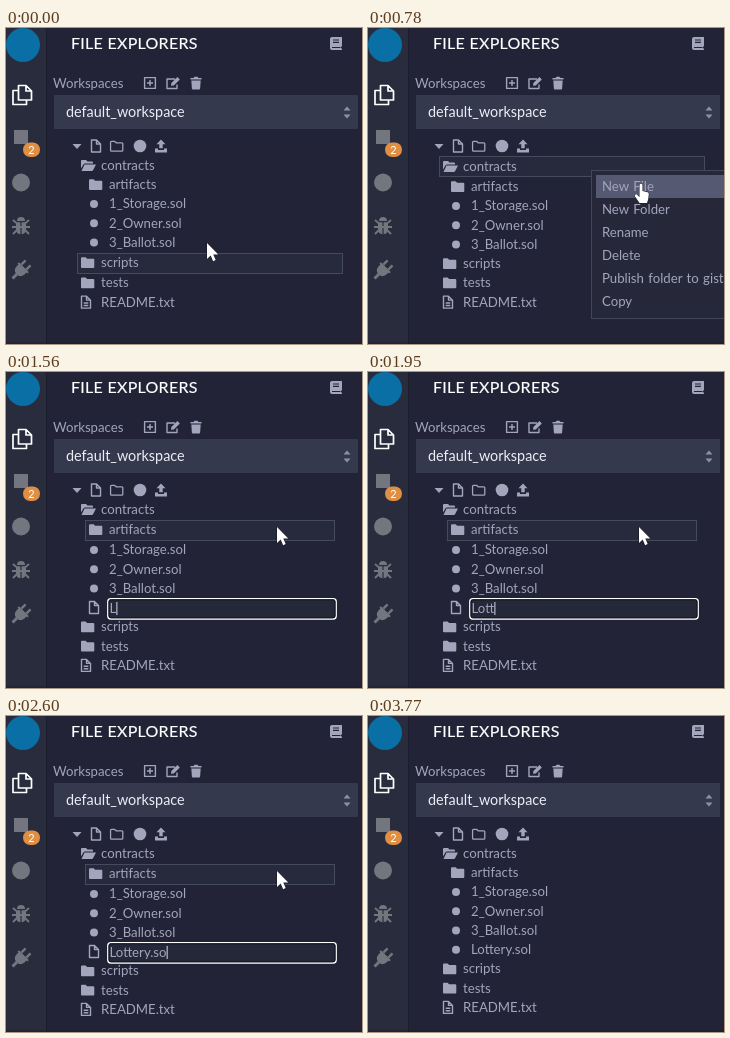
Animation, 356 px wide and 316 px high, one loop 4030 ms. Source, as an HTML page:

```html
<!DOCTYPE html>
<html lang="en">
<head>
<meta charset="utf-8">
<title>File explorer</title>
<style>
  html, body { margin: 0; width: 100%; height: 100%; overflow: hidden; background: #222336; }
  svg { display: block; width: 100vw; height: 100vh; }
  text { font: 13.2px Lato, "Open Sans", sans-serif; fill: #a2a5bb; word-spacing: 1px; white-space: pre; }
  .title { font-size: 16px; fill: #fff; letter-spacing: .28px; word-spacing: 0; stroke: #fff; stroke-width: .2; }
  .select { font-size: 14.4px; fill: #eceef6; }
  .badge { font-size: 11px; fill: #fff; text-anchor: middle; }
  .icon { fill: #a2a5bb; }
  .line { fill: none; stroke: #a2a5bb; stroke-width: 1.4; stroke-linejoin: round; }
  .side { fill: #74767f; stroke: #74767f; stroke-width: 0; }
  .cursor { fill: #fff; stroke: #15161f; stroke-width: 1; paint-order: stroke; }
  .hover { fill: #272a3c; stroke: #454a5d; }
</style>
</head>
<body>
<svg viewBox="0 0 356 316">
  <defs>
    <path id="folder" d="M-7-4.3q0-1 1-1h3.6l1.5 1.5h6.2q1 0 1 1v7.1q0 1-1 1h-11.3q-1 0-1-1z"/>
    <path id="open" d="M-7 3v-7.5q0-1 1-1h4l1.5 1.5h4.5q1 0 1 1v1h-8q-1 0-1.6 1zM-3.5-1h11.5l-2.8 5.5q-.5 1-1.4 1h-10.3z"/>
    <path id="file" d="M-4.5-6h5l4 4v8h-9zM.5-6v4h4"/>
    <path id="doc" d="M-4.5-6h5l4 4v8h-9zM.5-6v4h4M-2.3 .8h4.6M-2.3 3.4h4.6"/>
    <circle id="dot" r="4"/>
    <path id="arrow" d="M0 0v16l3.7-3.4 2.4 5.6 2.6-1.1-2.4-5.5h5z"/>
    <path id="hand" d="M-1.5 1q0-1.5 1.5-1.5t1.5 1.5v6l5 1.3q1.5.5 1.3 2l-.6 5-1.2 3.7h-7.5l-4.5-6.5q-.8-1.5.5-2t2 .8l2 1.7z"/>
  </defs>

  <rect width="40.5" height="316" fill="#292c3d"/>
  <path d="M40.5 0v316M0 315h356" stroke="#1c1d2d"/>
  <circle cx="17" cy="17" r="17" fill="#0a6fa4"/>

  <path d="M12.5 57.5h7.5l5.5 5.5v9h-13zM20 57.5v5.5h5.5M12 62.5h-5v14h13.5v-4" fill="none" stroke="#fff" stroke-width="1.7" stroke-linejoin="round"/>
  <rect class="side" x="8" y="102" width="14" height="14"/>
  <rect x="17" y="114.5" width="17" height="14.5" rx="7.2" fill="#e08f42"/>
  <text class="badge" x="25.5" y="125.5">2</text>
  <circle class="side" cx="15" cy="154.5" r="9"/>
  <g class="side" transform="translate(15 198)">
    <path d="M-4-5a4 4 0 0 1 8 0zM-5-3.8h4.4v12q-4.4-.5-4.4-5zM5-3.8h-4.4v12q4.4-.5 4.4-5z"/>
    <path d="M-8-6l3.5 3.2M8-6l-3.5 3.2M-9 1h18M-8 8l3.5-3.5M8 8l-3.5-3.5" fill="none" stroke-width="1.8"/>
  </g>
  <g class="side" transform="translate(15 242) rotate(45)">
    <path d="M-7-4h14v2h-1.3v2q0 5-4.2 6v6h-3v-6q-4.2-1-4.2-6v-2h-1.3z"/>
    <path d="M-3.5-4v-6M3.5-4v-6" stroke-width="2.4"/>
  </g>

  <text class="title" x="65" y="21">FILE EXPLORERS</text>
  <g transform="translate(330 15.5)">
    <path class="icon" d="M-6-4.5q0-2 2-2h10v9.5h-1v2h1v1.5h-10q-2 0-2-2z"/>
    <path d="M-3-3.5h6M-3-1.2h6M-4 4h8.5" stroke="#222336" stroke-width="1.2"/>
  </g>
  <text x="47" y="60">Workspaces</text>
  <path class="line" transform="translate(144 55)" d="M-5.4-5.4h10.8v10.8h-10.8zM-3 0h6M0-3v6"/>
  <g transform="translate(167 55)">
    <path class="line" d="M2-4h-8v9.5h10v-4"/>
    <path class="icon" d="M-2 2.8l.4-2.8 6-6 2.4 2.4-6 6z"/>
  </g>
  <path class="icon" transform="translate(190 55)" d="M-5.5-5h3l1-1.3h3l1 1.3h3v1.6h-11zM-4.7-2.4h9.4l-.6 8.2q-.1.8-.9.8h-6.4q-.8 0-.9-.8z"/>
  <rect x="48" y="67" width="304" height="34" fill="#34394d"/>
  <text class="select" x="60" y="88.5">default_workspace</text>
  <path d="M337.5 82.5l3.5-4 3.5 4zM337.5 86.5l3.5 4 3.5-4z" fill="#8d91a8"/>

  <path class="icon" d="M66.5 116h9l-4.5 5z"/>
  <use href="#file" class="line" x="90" y="118"/>
  <use href="#folder" class="line" transform="translate(111 118.3) scale(.92)"/>
  <circle class="icon" cx="134" cy="118" r="6.3"/>
  <path class="icon" transform="translate(155 118)" d="M0-6.5l4.5 4.8h-2.8v4h-3.4v-4h-2.8zM-6 2.5h3v1.6h6v-1.6h3v4h-12z"/>
  <g id="live"></g>
</svg>
<script>
const LOOP = 4030, ROW = 19.25;
const live = document.getElementById('live');
const fileName = 'Lottery.sol';
const keyTimes = [1560, 1690, 1820, 1950, 2080, 2080, 2210, 2340, 2470, 2600, 2860];
const menuItems = ['New File', 'New Folder', 'Rename', 'Delete', 'Publish folder to gist', 'Copy'];
// label, depth, icon, icon x
const tree = [
  ['contracts', 0, 'open', 82], ['artifacts', 1, 'folder', 90],
  ['1_Storage.sol', 1, 'dot', 88], ['2_Owner.sol', 1, 'dot', 88], ['3_Ballot.sol', 1, 'dot', 88],
  [fileName, 1, 'dot', 88],
  ['scripts', 0, 'folder', 82], ['tests', 0, 'folder', 82], ['README.txt', 0, 'doc', 80]
];
// start time, hovered row, pointer shape, pointer x, y
const poses = [
  [0, 'scripts', 'arrow', 201, 215], [130, '2_Owner.sol', 'arrow', 211, 190],
  [260, 'artifacts', 'arrow', 221, 160], [390, 'contracts', 'arrow', 225, 144],
  [780, 'contracts', 'hand', 273, 156], [1040, 'artifacts', 'arrow', 271, 155],
  [3120, 'artifacts'], [3640, '']
];

const label = (x, y, s) => `<text x="${x}" y="${y + 4.5}">${s}</text>`;
const icon = (id, x, y, cls = 'icon') => `<use href="#${id}" class="${cls}" x="${x}" y="${y}"/>`;

function drawTree(hovered, hasFile, editing) {
  let y = 137.4, out = '';
  for (const [name, depth, kind, iconX] of tree) {
    if (name === fileName && !hasFile) continue;
    const hot = name === hovered;
    if (hot) {
      y += 1;
      out += `<rect class="hover" x="${71.5 + 8 * depth}" y="${Math.round(y - 10) + .5}" width="${265 - 16 * depth}" height="20"/>`;
    }
    if (name !== fileName || !editing)
      out += icon(kind, iconX, y, kind === 'doc' ? 'line' : 'icon') + label(95 + 8 * depth, y, name);
    y += ROW + (hot ? 1 : 0);
  }
  return out;
}

function drawInput(typed) {
  return icon('file', 88, 235.5, 'line') +
    '<rect x="101.8" y="226.6" width="228.4" height="20.4" rx="3" fill="#242839" stroke="#fff" stroke-width="1.4"/>' +
    '<rect x="103" y="227.8" width="226" height="18" rx="2" fill="none" stroke="#12131c"/>' +
    label(103.5, 236, typed + '<tspan fill="#e4e6f0" dx="-1">|</tspan>');
}

function drawMenu(active) {
  return '<rect x="223.5" y="142.5" width="140" height="148" fill="#26283a" stroke="#42465a"/>' +
    (active ? '<rect x="228" y="147" width="128" height="23" fill="#555971"/>' : '') +
    menuItems.map((s, i) => label(234, 158 + 23.1 * i, s)).join('');
}

function scene(t) {
  const [, hovered, pointer, x, y] = poses.filter(p => p[0] <= t).pop();
  const editing = t >= 1040 && t < 3120;
  const typed = fileName.slice(0, keyTimes.filter(k => k <= t).length);
  return drawTree(hovered, t >= 1040, editing) +
    (editing ? drawInput(typed) : '') +
    (t >= 650 && t < 1040 ? drawMenu(t >= 780) : '') +
    (pointer ? icon(pointer, x, y, 'cursor') : '');
}

let shown;
function tick(now) {
  const markup = scene(now % LOOP);
  if (markup !== shown) live.innerHTML = shown = markup;
  requestAnimationFrame(tick);
}
tick(performance.now());
</script>
</body>
</html>
```
